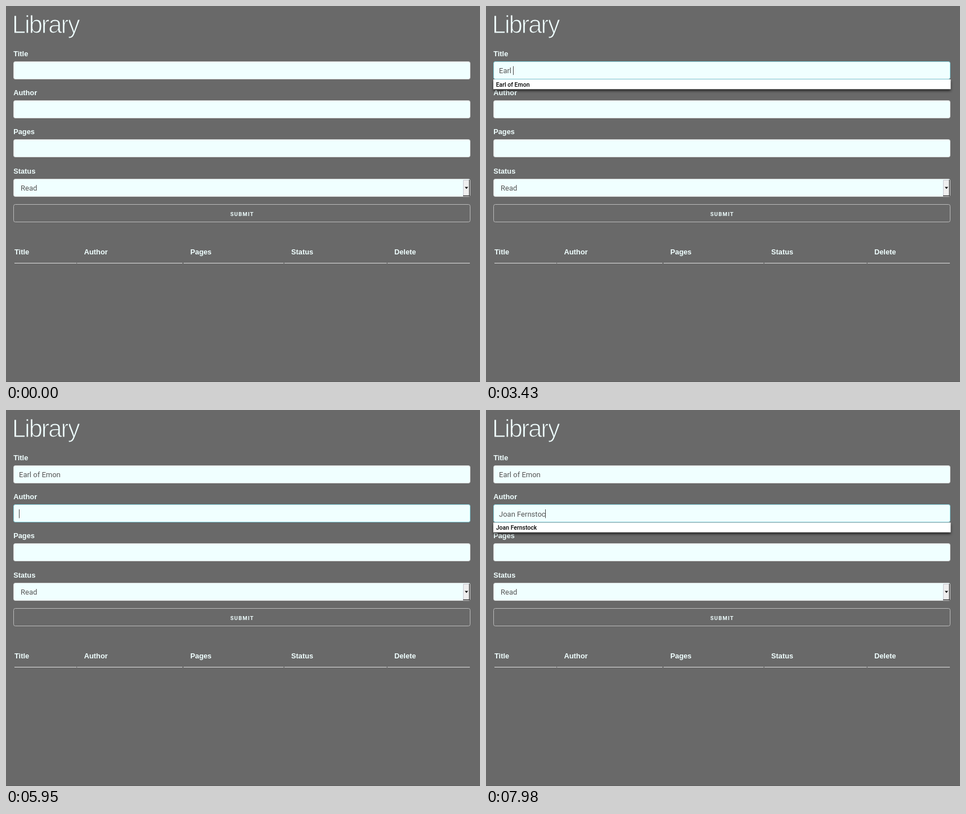
Recreate the animation shown at these times as an HTML page. Size 841 by 666 pixels, loop 8000 ms.

```html
<!DOCTYPE html>
<html lang="en">
<head>
<meta charset="utf-8">
<title>Library</title>
<style>
  html, body { margin: 0; width: 100%; height: 100%; overflow: hidden; background: #696969; }
  svg { display: block; }
  text { white-space: pre; }
  .heading {
    font: 44px "Liberation Sans", Arial, sans-serif; letter-spacing: -2.3px;
    fill: #f0ffff; stroke: #696969; stroke-width: 1.2px;
  }
  .label { font: bold 12.8px "Liberation Sans", Arial, sans-serif; fill: #f0ffff; }
  .value { font: 13px Roboto, sans-serif; fill: #555; }
  .option { font: 500 10.5px Roboto, sans-serif; fill: #000; }
  .submit { font: bold 9.5px Roboto, sans-serif; letter-spacing: 1.2px; fill: #f0ffff; }
  .box { fill: #f0ffff; stroke: #d1d1d1; }
  .box.focus { stroke: #7cc9d6; }
  .button { fill: none; stroke: #bbb; }
  .rule { fill: #e1e1e1; }
  .caret { fill: #444; }
  .menu { fill: #fff; filter: drop-shadow(0 3px 2px rgba(0, 0, 0, .65)); }
</style>
</head>
<body>
<svg id="stage" width="841" height="666" viewBox="0 0 841 666"></svg>
<script>
const LOOP = 8000, BLINK = 567, MENU_LAG = 70, ROW = 17;
const stage = document.getElementById("stage");

function add(tag, attrs, text = "") {
  const el = document.createElementNS("http://www.w3.org/2000/svg", tag);
  for (const key in attrs) el.setAttribute(key, attrs[key]);
  el.textContent = text;
  return stage.appendChild(el);
}
const label = (x, y, text, cls = "label") => add("text", { x, y, class: cls }, text);
const rect = (x, y, width, height, cls, rx = 0) =>
  add("rect", { x, y, width, height, rx, class: cls });
const show = (el, on) => el.setAttribute("visibility", on ? "visible" : "hidden");

// Page
label(10.8, 48, "Library", "heading");
const boxes = ["Title", "Author", "Pages", "Status"].map((name, i) => {
  const y = 98.5 + i * 69.4;
  label(13.2, y - 10, name);
  return rect(13.5, Math.round(y) - .5, 810, 31, "box", 3);
});

// Select
label(26, 327, "Read", "value");
add("rect", { x: 811, y: 308, width: 11, height: 28, fill: "#efefef" });
add("path", { d: "M811.5 336V308.5H822", fill: "none", stroke: "#c9c9d2" });
add("path", { d: "M811 336.3H822.3V308", fill: "none", stroke: "#3c3c3c", "stroke-width": 1.4 });
add("path", { d: "M814 320.5h6l-3 3.4z", fill: "#000" });

rect(13.5, 351.5, 810, 31, "button", 3);
label(398, 371.5, "SUBMIT", "submit");

// Table head
[["Title", 15, 15, 125], ["Author", 138.5, 126, 313], ["Pages", 327, 315, 492.5],
 ["Status", 506, 494, 675.5], ["Delete", 689, 677, 823]].forEach(([name, x, from, to]) => {
  label(x, 439.5, name);
  rect(from, 455, to - from, 1, "rule");
});
add("rect", { x: 0, y: 665, width: 841, height: 1, fill: "#606060" });

// Typed fields: one time per character in keys
const fields = [
  {
    box: boxes[0], y: 98, focus: 2310, blur: 4480, text: "Earl of Emon",
    keys: [2730, 3010, 3150, 3290, 3430, 3500, 3570, 3710, 3850, 3990, 4060, 4200],
    options: ["Earl of Emon", "eat some beef"]
  },
  {
    box: boxes[1], y: 167.4, focus: 4480, blur: LOOP, text: "Joan Fernstock",
    keys: [6230, 6370, 6510, 6650, 6790, 6930, 7140, 7280, 7420, 7560, 7700, 7840, 7980],
    options: ["Joan Fernstock", "J.B.N. Pelvern"]
  }
];
for (const f of fields) {
  f.value = label(23, f.y + 21.2, "", "value");
  f.caret = rect(23, f.y + 8.6, 1, 15.5, "caret");
}
for (const f of fields) {
  f.menu = rect(13, f.y + 32, 811.5, ROW, "menu");
  f.rows = f.options.map((_, i) => label(17.7, f.y + 44.6 + i * ROW, "", "option"));
}

const typed = (f, t) => f.text.slice(0, f.keys.filter(k => k <= t).length);

function drawField(f, t) {
  const text = typed(f, t);
  const active = t >= f.focus && t < f.blur;
  f.box.classList.toggle("focus", active);
  f.value.textContent = text;

  const last = Math.max(f.focus, ...f.keys.filter(k => k <= t));
  const width = text ? f.value.getComputedTextLength() : 0;
  f.caret.setAttribute("x", Math.round(22.6 + width));
  show(f.caret, active && Math.floor((t - last) / BLINK) % 2 === 0);

  const query = typed(f, t - MENU_LAG).toLowerCase();
  const hits = active && query
    ? f.options.filter(o => o.toLowerCase().startsWith(query)) : [];
  show(f.menu, hits.length > 0);
  f.menu.setAttribute("height", Math.max(1, hits.length) * ROW + .3);
  f.rows.forEach((row, i) => { row.textContent = hits[i] || ""; });
}

function frame() {
  const t = performance.now() % LOOP;
  fields.forEach(f => drawField(f, t));
  requestAnimationFrame(frame);
}
frame();
</script>
</body>
</html>
```
